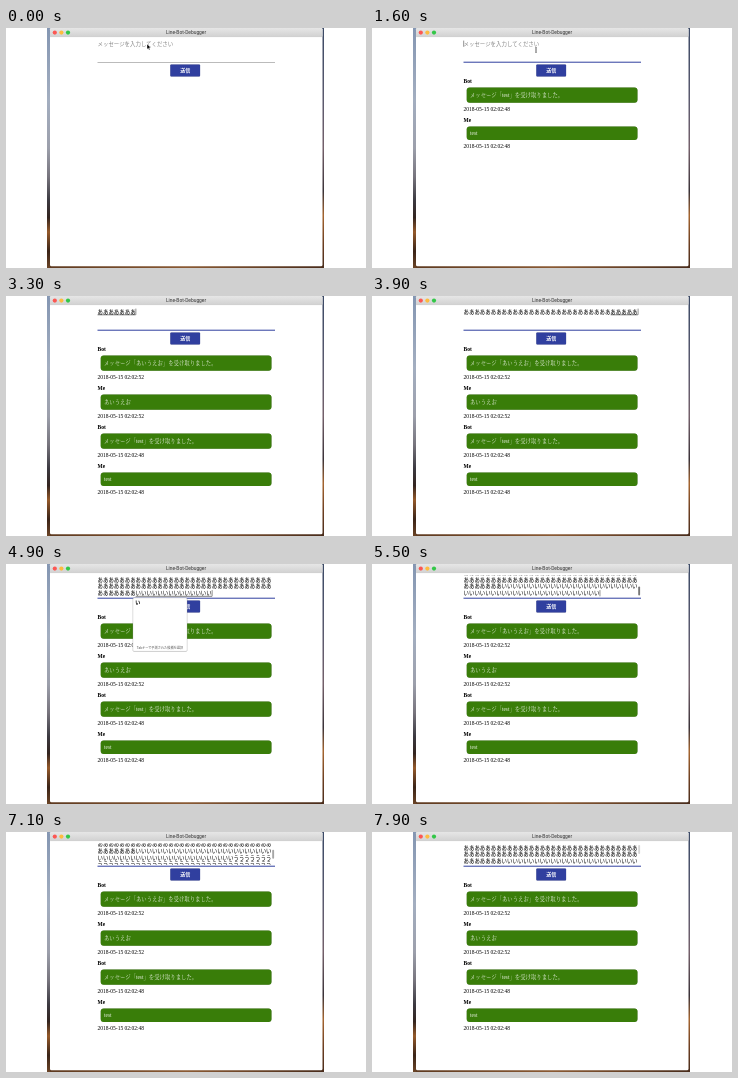
These frames come from a looping animation (360 px wide and 240 px high, 8 s). An HTML page:

```html
<!DOCTYPE html>
<html lang="ja">
<head>
<meta charset="utf-8">
<title>Line-Bot-Debugger</title>
<style>
html, body { margin: 0; width: 100%; height: 100%; overflow: hidden; background: #fff; }
svg { display: block; width: 360px; height: 240px; }
text { font: 5.45px Roboto, "Noto Sans CJK JP", sans-serif; white-space: pre; }
.serif { font: 5.5px "Liberation Serif", "Noto Serif CJK JP", "Noto Sans CJK JP", serif; }
.bubble { font-size: 5.38px; fill: #e8f0e2; }
.bold { font-weight: bold; }
.soft { filter: drop-shadow(0 .5px .6px #0007); }
.faint { filter: drop-shadow(0 .4px .4px #0005); }
</style>
</head>
<body>
<svg viewBox="0 0 360 240">
  <defs>
    <linearGradient id="left" x1="0" y1="0" x2="0" y2="1">
      <stop offset="0" stop-color="#8496b2"/>
      <stop offset=".3" stop-color="#a3aec0"/>
      <stop offset=".5" stop-color="#9c9fab"/>
      <stop offset=".62" stop-color="#77747d"/>
      <stop offset=".72" stop-color="#3b3940"/>
      <stop offset=".79" stop-color="#33241f"/>
      <stop offset=".85" stop-color="#94592a"/>
      <stop offset=".93" stop-color="#3a2418"/>
      <stop offset="1" stop-color="#6b4426"/>
    </linearGradient>
    <linearGradient id="right" x1="0" y1="0" x2="0" y2="1">
      <stop offset="0" stop-color="#3c4a66"/>
      <stop offset=".3" stop-color="#5b5a6e"/>
      <stop offset=".5" stop-color="#74606a"/>
      <stop offset=".68" stop-color="#3a3238"/>
      <stop offset=".78" stop-color="#a5652f"/>
      <stop offset=".9" stop-color="#6b3d20"/>
      <stop offset="1" stop-color="#4a2d1c"/>
    </linearGradient>
    <linearGradient id="ground">
      <stop offset="0" stop-color="#5e3a20"/>
      <stop offset=".5" stop-color="#8a5a34"/>
      <stop offset="1" stop-color="#4a2d1c"/>
    </linearGradient>
    <linearGradient id="bar" x1="0" y1="0" x2="0" y2="1">
      <stop offset="0" stop-color="#e6e6e6"/>
      <stop offset="1" stop-color="#d2d2d2"/>
    </linearGradient>
    <radialGradient id="glow">
      <stop offset="0" stop-color="#fff" stop-opacity=".45"/>
      <stop offset="1" stop-color="#fff" stop-opacity=".1"/>
    </radialGradient>
    <clipPath id="area"><rect x="91" y="11.5" width="178" height="21.6"/></clipPath>
  </defs>

  <rect x="41" width="100" height="240" fill="url(#left)"/>
  <rect x="218" width="100" height="240" fill="url(#right)"/>
  <rect x="44" y="236" width="272" height="4" fill="url(#ground)"/>
  <rect x="44" width="272.5" height="238.3" rx="1.5" fill="#fff"/>
  <rect x="44" width="272.5" height="8.6" rx="1.2" fill="url(#bar)"/>
  <path d="M44 8.6h272.5" stroke="#b5b5b5" stroke-width=".5"/>
  <circle cx="48.8" cy="4.6" r="2.1" fill="#fc5753"/>
  <circle cx="55.4" cy="4.6" r="2.1" fill="#fdbc40"/>
  <circle cx="62" cy="4.6" r="2.1" fill="#33c748"/>
  <text x="180" y="6.3" text-anchor="middle" fill="#333" style="font-size:4.9px">Line-Bot-Debugger</text>

  <g clip-path="url(#area)" id="field"></g>
  <rect id="line" x="91.5" width="177.5"/>
  <rect id="thumb" x="266.2" width="1.9" height="9" rx=".95" fill="#777"/>

  <g class="faint"><rect id="button" x="164.3" y="36.6" width="29.8" height="11.8" rx=".9" fill="#303f9f"/></g>
  <rect id="ripple" x="164.3" y="36.6" width="29.8" height="11.8" rx=".9" fill="url(#glow)"/>
  <text class="bold" x="179.2" y="44.3" text-anchor="middle" fill="#fff" style="font-size:5px">送信</text>

  <g id="log"></g>

  <g id="popup">
    <rect class="soft" width="54" height="53.3" rx="1" fill="#fff" stroke="#bbb" stroke-width=".3"/>
    <text id="guess" class="bold" x="2.2" y="6.2" style="font-size:5px"></text>
    <text x="27" y="50.6" text-anchor="middle" fill="#555" style="font-size:3.2px">Tabキーで予測された候補を選択</text>
  </g>

  <g id="mouse" stroke-linejoin="round">
    <path id="arrow" d="M0 0v5.2l1.3-1 .8 1.7.9-.4-.8-1.7h1.6z" stroke="#fff" stroke-width=".4"/>
    <path id="beam" d="M-1-2.6q1 0 1 .8v3.6q0 .8-1 .8M1-2.6q-1 0-1 .8v3.6q0 .8 1 .8" fill="none" stroke="#333" stroke-width=".45"/>
    <path id="hand" d="M-.5-2q.5-.7 1 0v1.9l2 .6q.6.4.3 1.3l-.6 1.6h-2.4l-1.8-2.3q.2-.8 1.5.1z" fill="#fff" stroke="#111" stroke-width=".5"/>
  </g>
</svg>
<script>
const LOOP = 8000, STEP = 100, COLS = 32, ROW = 6.75, CHAR = 5.45, LEFT = 91.5;
const $ = id => document.getElementById(id);
const clamp = (v, lo, hi) => Math.min(hi, Math.max(lo, v));
const within = (t, a, b) => t >= a && t < b;
const show = (id, on) => $(id).setAttribute('visibility', on ? 'visible' : 'hidden');
const set = (id, attrs) => { for (const k in attrs) $(id).setAttribute(k, attrs[k]); };

// Held key: about 7 characters per step
const held = (t, start, max) => clamp(Math.round((t - start) * 0.07), 0, max);
const typed = (t, start, word) => word.slice(0, clamp((t - start) / STEP, 0, word.length));

const messages = [
  { at: 1200, who: 'Me', text: 'test', sec: 48, h: 13.3 },
  { at: 1300, who: 'Bot', text: 'メッセージ「test」を受け取りました。', sec: 48, h: 15.2 },
  { at: 2300, who: 'Me', text: 'あいうえお', sec: 52, h: 15.2 },
  { at: 2400, who: 'Bot', text: 'メッセージ「あいうえお」を受け取りました。', sec: 52, h: 15.2 }
];

const path = [
  [0, 141, 16], [300, 141, 18], [800, 150, 22], [1100, 180, 43], [1250, 180, 43],
  [1500, 164, 22], [2100, 164, 22], [2300, 191, 45], [2600, 191, 45], [2900, 176, 22], [3200, 176, 22]
];

// Text in the field and the index where the uncommitted part begins
function entry(t) {
  if (t < 1200) return { text: typed(t, 300, 'test'), from: 4 };
  if (t < 2300) return { text: typed(t, 1600, 'あいうえお'), from: t < 2100 ? 0 : 5 };
  const a = held(t, 3200, 27) + held(t, 3830, 44);
  const i = held(t, 4700, 50), u = held(t, 5600, 49);
  const text = 'あ'.repeat(a) + 'い'.repeat(i) + 'う'.repeat(u);
  const from = t < 3700 ? 0 : t < 4600 ? 27 : t < 5500 ? 71 : t < 6500 ? 121 : text.length;
  return { text, from };
}

function drawField(t, focused) {
  const { text, from } = entry(t);
  const rows = Math.max(1, Math.ceil(text.length / COLS));
  const over = Math.max(0, rows - 3);
  const p = clamp((t - 6700) / 800, 0, 1);
  const back = 1 - p * p * (3 - 2 * p);
  let out = '';
  for (let r = 0; r < rows; r++) {
    const part = text.slice(r * COLS, (r + 1) * COLS);
    const y = 17.6 + (r - over * back) * ROW;
    out += `<text x="${LEFT}" y="${y}">${part}</text>`;
    const wide = /^[a-z]/.test(text) ? 2.7 : CHAR;
    const x0 = LEFT + Math.max(0, from - r * COLS) * wide, x1 = LEFT + part.length * wide;
    if (x1 > x0) out += `<path d="M${x0} ${y + 1.2}H${x1}" stroke="#000" stroke-width=".5"/>`;
    if (focused && r === rows - 1)
      out += `<path d="M${x1 + .2} ${y - 5}v6.2" stroke="#222" stroke-width=".5"/>`;
  }
  if (!text) out += `<text x="${LEFT}" y="17.6" fill="#858585">メッセージを入力してください</text>`;
  $('field').innerHTML = out;
  set('thumb', { y: 13 + 9.5 * back, opacity: t < 6700 ? 1 : 1 - .7 * p });
  show('thumb', over > 0);
}

function drawLog(t) {
  let y = 53;
  $('log').innerHTML = messages.filter(m => t >= m.at).reverse().map(m => {
    const top = y + 6.6, mid = top + m.h / 2;
    const out = `<text class="serif bold" x="${LEFT}" y="${y + 1.8}">${m.who}</text>
      <rect class="faint" x="94.7" y="${top}" width="170.8" height="${m.h}" rx="3" fill="#397d09"/>
      <text class="serif bubble" x="98" y="${mid + 1.9}">${m.text}</text>
      <text class="serif" x="${LEFT}" y="${top + m.h + 7.9}">2018-05-15 02:02:${m.sec}</text>`;
    y += 23.8 + m.h;
    return out;
  }).join('');
}

function drawMouse(t) {
  const k = clamp(path.findIndex(q => q[0] > t), 1, path.length - 1);
  const [t0, x0, y0] = path[k - 1], [t1, x1, y1] = path[k];
  const f = clamp((t - t0) / (t1 - t0), 0, 1);
  const x = x0 + (x1 - x0) * f, y = y0 + (y1 - y0) * f;
  const on = t < 400 || within(t, 800, 1700) || within(t, 2100, 3200);
  const over = x > 164 && x < 194 && y > 36 && y < 49;
  const kind = over ? 'hand' : y < 34 && t >= 200 ? 'beam' : 'arrow';
  for (const id of ['arrow', 'beam', 'hand']) show(id, on && id === kind);
  set('mouse', { transform: `translate(${x} ${y})` });
  set('button', { fill: on && over ? '#29368c' : '#303f9f' });
}

function draw(t) {
  const focused = within(t, 200, 1100) || within(t, 1500, 2300) || t >= 2900;
  drawField(t, focused);
  drawLog(t);
  drawMouse(t);
  set('line', focused ? { y: 33.7, height: 1, fill: '#303f9f' } : { y: 34.2, height: .5, fill: '#777' });
  show('ripple', within(t, 1100, 1400) || within(t, 2300, 2700));

  const first = within(t, 4800, 5500), second = within(t, 5700, 6500);
  show('popup', first || second);
  set('popup', { transform: `translate(${first ? 127 : 225} 34)` });
  $('guess').textContent = first ? 'い' : 'う';
}

let last = -1;
function tick(now) {
  const t = Math.floor(now % LOOP / STEP) * STEP;
  if (t !== last) draw(last = t);
  requestAnimationFrame(tick);
}
draw(0);
requestAnimationFrame(tick);
</script>
</body>
</html>
```
